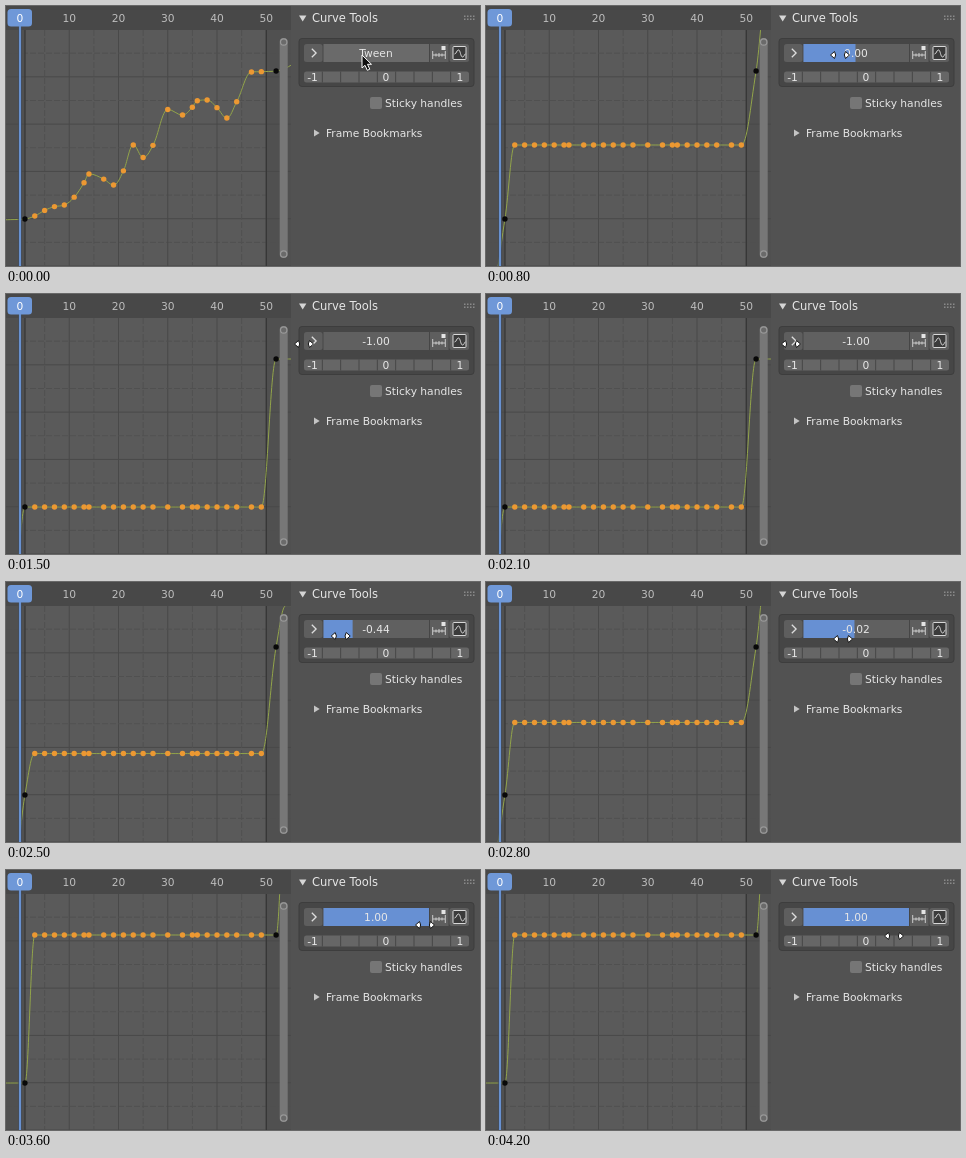
An HTML page for the animation above (4.3 s loop, 474 px wide and 260 px high).

```html
<!DOCTYPE html>
<html lang="en">
<head>
<meta charset="utf-8">
<title>Curve Tools</title>
<style>
  html, body { margin: 0; width: 100%; height: 100%; overflow: hidden; background: #525252; }
  svg { display: block; width: 100vw; height: 100vh; }
  text { font-family: "DejaVu Sans", sans-serif; font-size: 10.7px; fill: #e6e6e6; }
  .mid { text-anchor: middle; }
  .ruler text { fill: #bdbdbd; }
</style>
</head>
<body>
<svg viewBox="0 0 474 260">
  <defs>
    <clipPath id="view"><rect y="24" width="285" height="236"/></clipPath>
  </defs>

  <rect width="285" height="260" fill="#5a5a5a"/>
  <rect width="19" height="260" fill="#505050"/>
  <rect x="260" width="25" height="260" fill="#505050"/>
  <g id="grid" fill="none"></g>
  <path d="M19 24V260M260.300 24V260" stroke="#363636" stroke-width="1.200"/>

  <g clip-path="url(#view)">
    <path id="curve" fill="none" stroke="#92a44a"/>
    <g id="keys" fill="#ec9832"></g>
  </g>

  <rect width="285" height="24" fill="#484848"/>
  <g id="ruler" class="ruler mid"></g>
  <path d="M14 18V260" stroke="#434c5c" stroke-width="3.400"/>
  <path d="M14 18V260" stroke="#6b95d6" stroke-width="1.900"/>
  <rect x="1.500" y="3" width="24.500" height="17.500" rx="3.500" fill="#6f98d8"/>
  <text class="mid" x="13.800" y="15.800" style="fill:#fff">0</text>

  <rect x="273.700" y="32" width="8" height="220" rx="4" fill="#777"/>
  <g fill="#6a6a6a" stroke="#999" stroke-width="1.200">
    <circle cx="277.700" cy="36" r="3.200"/><circle cx="277.700" cy="248" r="3.200"/>
  </g>

  <rect x="285" width="189" height="260" fill="#525252"/>
  <path d="M293 9.500h7.400l-3.700 6z" fill="#d5d5d5"/>
  <text x="306" y="16" style="font-size:11.500px">Curve Tools</text>
  <g id="grip" fill="#8a8a8a"></g>

  <rect x="293" y="32.500" width="175" height="48" rx="3" fill="#464646" stroke="#3d3d3d"/>
  <rect x="298" y="38" width="18.500" height="18" rx="2.500" fill="#5e5e5e"/>
  <path d="M305.800 42.800l4.300 4.200-4.300 4.200" fill="none" stroke="#ddd" stroke-width="1.300"/>
  <rect id="slot" x="317.500" y="38" width="105.500" height="18"/>
  <rect id="fill" x="317.500" y="38" height="18" fill="#6790d3"/>
  <text id="label" class="mid" x="370" y="50.800"></text>

  <rect x="424" y="38" width="18.500" height="18" fill="#5e5e5e"/>
  <path d="M426.700 45v8M439.300 45v8M433 47v4M427 49h12M430 47.500v3M436 47.500v3" stroke="#ccc" fill="none"/>
  <rect x="435.500" y="40" width="4" height="4" fill="#e4e4e4"/>
  <rect x="443.500" y="38" width="19.500" height="18" rx="2.500" fill="#5e5e5e"/>
  <rect x="447" y="40.500" width="13" height="13" rx="1" fill="#3b3b3b" stroke="#d8d8d8"/>
  <path d="M448.500 48c2 0 2-4 4-4s2 7 4 7 1.500-3 3-3" fill="none" stroke="#d8d8d8"/>

  <rect x="298" y="65.500" width="165" height="11" rx="2.500" fill="#666"/>
  <path id="ticks" stroke="#464646"/>
  <g class="mid">
    <text x="306.500" y="74.800">-1</text>
    <text x="380" y="74.800">0</text>
    <text x="454" y="74.800">1</text>
  </g>

  <rect x="364" y="91" width="12" height="12" rx="2" fill="#767676"/>
  <text x="379" y="101">Sticky handles</text>
  <path d="M308 123.500v7l5.700-3.500z" fill="#c4c4c4"/>
  <text x="320" y="131">Frame Bookmarks</text>

  <path id="arrow" d="M0 0v13l3-2.700 2.300 5 2.500-1.100-2.300-4.900h4z" fill="#111" stroke="#fff"/>
  <g id="drag" fill="#fff" stroke="#161616" stroke-linejoin="round">
    <path d="M-9.500 0l4-3.500 1.200 3.500-1.200 3.500z"/><path d="M9.500 0l-4-3.500-1.200 3.500 1.200 3.500z"/>
  </g>
</svg>
<script>
const LOOP = 4300, STEP = 100, PRESS = 200;
const SCALE = 4.925, LOW = 213, HIGH = 65, SPAN = 51 * SCALE, HANDLE = 0.39;
const $ = id => document.getElementById(id);
const frameX = f => 14 + f * SCALE;
const linear = u => u, easeIn = u => u ** 1.5;

// frame, height at the turning points of the resting curve
const turns = [[1, 213], [6, 201], [9, 199], [14, 168], [19, 179], [23, 139], [25, 151.5],
  [30, 103.5], [33, 109], [36.5, 91], [42, 112], [46, 66], [52, 65]];
// time, value, cursor x, cursor y
const poses = [[0, 0, 356, 49], [800, 0, 354, 49], [1200, -0.68, 316, 51], [1390, -1, 298, 50],
  [1900, -1, 298, 50], [2100, -1, 305, 50], [2800, -0.02, 357, 57], [3300, 0.66, 394, 63],
  [3550, 1, 419, 55], [4000, 1, 419, 55], [4200, 1, 408, 66]];

function sample(track, t, col, ease = linear) {
  const i = Math.max(1, track.findIndex(k => k[0] >= t));
  const a = track[i - 1], b = track[i];
  return a[col] + (b[col] - a[col]) * ease((t - a[0]) / (b[0] - a[0]));
}

// keys sit at these gaps, in frames
let frame = 1;
const frames = [frame, ...[..."222222132222233212222323"].map(gap => frame += +gap)];
const rest = frames.map(f => [frameX(f), sample(turns, f, 1, easeIn)]);

// automatic handles: flat at extremes, never past a neighbour
function slope(a, p, b) {
  const before = (p[1] - a[1]) / (p[0] - a[0]), after = (b[1] - p[1]) / (b[0] - p[0]);
  if (before * after <= 0) return 0;
  const limit = Math.min(Math.abs(before), Math.abs(after)) / HANDLE;
  const mean = (before + after) / 2;
  return Math.sign(mean) * Math.min(Math.abs(mean), limit);
}

// the curve repeats on both sides, raised by its own height each time
function curvePath(keys) {
  const cycle = keys.slice(0, -1), pts = [];
  for (let n = -1; n <= 1; n++)
    for (const [x, y] of cycle) pts.push([x + n * SPAN, y - n * (LOW - HIGH)]);
  const from = cycle.length - 3, to = 2 * cycle.length + 3;
  const s = pts.map((p, i) => i && i < pts.length - 1 ? slope(pts[i - 1], p, pts[i + 1]) : 0);
  let d = "M" + pts[from];
  for (let i = from + 1; i <= to; i++) {
    const [x0, y0] = pts[i - 1], [x1, y1] = pts[i], h = (x1 - x0) * HANDLE;
    d += `C${x0 + h} ${y0 + h * s[i - 1]} ${x1 - h} ${y1 - h * s[i]} ${x1} ${y1}`;
  }
  return d;
}

function buildStatic() {
  let grid = "", ruler = "", grip = "", ticks = "";
  for (let i = 0; i <= 10; i++) {
    const x = frameX(5 * i), y = 260 - 23.65 * i;
    const line = i % 2 ? 'stroke="#505050" stroke-dasharray="6 2"' : 'stroke="#494949"';
    if (i) grid += `<path d="M${x} 24V260" ${line}/>`;
    grid += `<path d="M0 ${y}H285" ${line}/>`;
    if (i && i % 2 === 0) ruler += `<text x="${x}" y="15.8">${5 * i}</text>`;
  }
  for (let i = 0; i < 8; i++)
    grip += `<rect x="${458 + (i % 4) * 3}" y="${9.5 + (i >> 2) * 3}" width="1.5" height="1.5"/>`;
  for (let i = 1; i < 9; i++) ticks += `M${298 + i * 165 / 9} 65.5v11`;
  $("grid").innerHTML = grid;
  $("ruler").innerHTML = ruler;
  $("grip").innerHTML = grip;
  $("ticks").setAttribute("d", ticks);
  $("keys").innerHTML = rest.map(([x], i) =>
    `<circle cx="${x}" r="2.7"${i % (rest.length - 1) ? "" : ' fill="#080808"'}/>`).join("");
}

function draw(t) {
  const active = t >= PRESS, v = sample(poses, t, 1);
  const level = (LOW + HIGH) / 2 - v * (LOW - HIGH) / 2;
  const last = rest.length - 1;
  const keys = rest.map(([x, y], i) => [x, active && i % last ? level : y]);
  $("curve").setAttribute("d", curvePath(keys));
  keys.forEach((k, i) => $("keys").children[i].setAttribute("cy", k[1]));

  $("slot").setAttribute("fill", active ? "#606060" : "#6a6a6a");
  $("fill").setAttribute("width", active ? 104 * (v + 1) / 2 + (v === 1 ? 1.5 : 0) : 0);
  $("label").textContent = active ? (Math.round(v * 100) / 100 + 0).toFixed(2) : "Tween";

  const at = `translate(${sample(poses, t, 2)} ${sample(poses, t, 3)})`;
  for (const [id, on] of [["arrow", !active], ["drag", active]]) {
    $(id).setAttribute("transform", at);
    $(id).setAttribute("visibility", on ? "visible" : "hidden");
  }
}

buildStatic();
const start = performance.now();
function tick() {
  const t = (performance.now() - start) % LOOP;
  draw(Math.floor(t / STEP) * STEP);
  requestAnimationFrame(tick);
}
tick();
</script>
</body>
</html>
```
